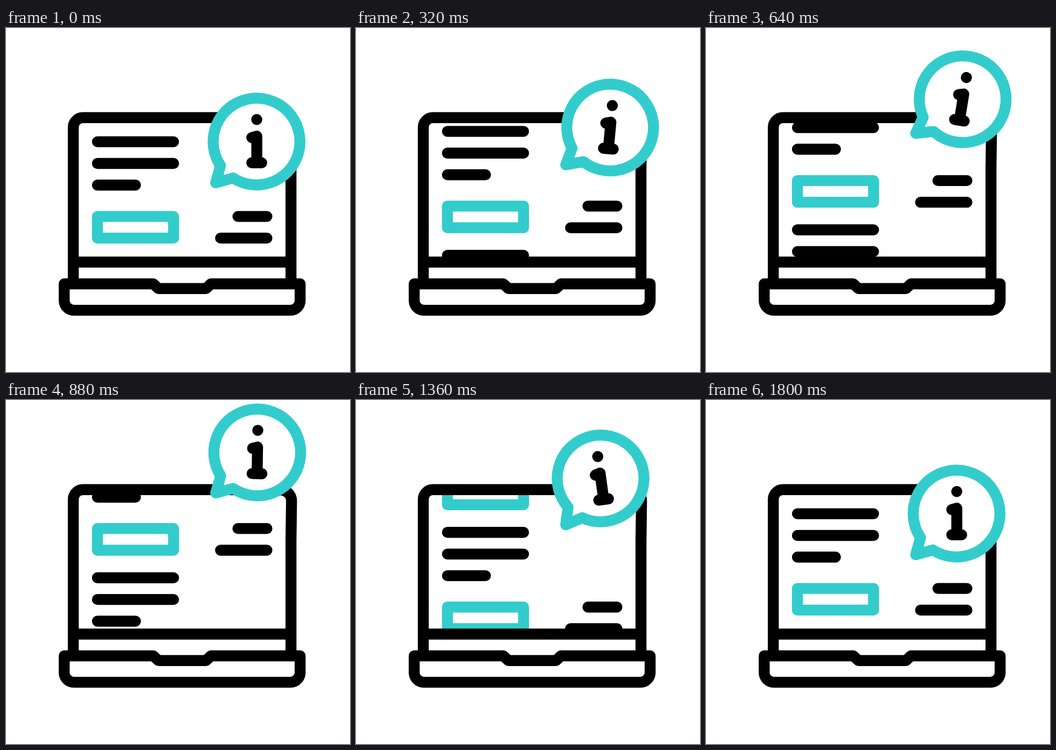
An HTML page that plays this animation: 640 px wide and 640 px high, repeating every 1.82 s.

```html
<!DOCTYPE html>
<html lang="en">
<head>
<meta charset="utf-8">
<title>Laptop information</title>
<style>
  html, body { margin: 0; width: 100%; height: 100%; overflow: hidden; background: #fff; }
  svg { display: block; width: 100vw; height: 100vh; }
  path { fill: none; stroke: #000; stroke-width: 20.4; stroke-linecap: round; stroke-linejoin: round; }
  .accent { stroke: #3cc; }
</style>
</head>
<body>
<svg viewBox="0 0 640 640">
  <defs>
    <clipPath id="screen"><rect x="125" y="167" width="405" height="268"/></clipPath>
    <g id="content">
      <path d="M170.1 211.6H311.7M170.1 252H311.7M170.1 292.3H240.8M431.5 350.6H485.4M399.2 390.9H485.4"/>
      <path class="accent" d="M170.1 350.6H311.7V390.9H170.1Z"/>
    </g>
  </defs>

  <g clip-path="url(#screen)">
    <g id="scroll">
      <use href="#content"/>
      <use href="#content" y="230.6"/>
    </g>
  </g>

  <path d="M125.2 476V185A18 18 0 0 1 143.2 166.8H396L510 167.4C522 167.4 531.2 176 531.2 188L530.2 262V476M125.2 435.5H530.2"/>
  <path d="M108.3 476H274L283.6 484.8H372L381.3 476H547.2V507A18 18 0 0 1 529.2 525.1H126.3A18 18 0 0 1 108.3 507Z"/>

  <g id="bubble">
    <path class="accent" style="fill:#fff" d="M399 256L390.2 287.9L422.3 279A80.7 80.7 0 1 0 399 256Z"/>
    <circle cx="466.5" cy="170.2" r="10.3"/>
    <path d="M457.3 203.8L466.6 201.3V250.8M457.3 250.8H475.6"/>
  </g>
</svg>
<script>
  const LOOP = 1820, END = 1800, PAGE = 230.6, LIFT = 115.2, TILT = 9.5;
  const scroll = document.getElementById('scroll');
  const bubble = document.getElementById('bubble');

  // Eased 0..1 progress between two times.
  function ease(t, from, to) {
    const x = Math.min(1, Math.max(0, (t - from) / (to - from)));
    return x * x * (3 - 2 * x);
  }

  function draw(now) {
    const t = Math.min(now % LOOP, END);
    const lift = LIFT * (ease(t, 0, 900) - ease(t, 900, END));
    const tilt = TILT * (ease(t, 0, 600) - 2 * ease(t, 600, 1200) + ease(t, 1200, END));
    scroll.setAttribute('transform', `translate(0 ${-PAGE * ease(t, 0, END)})`);
    bubble.setAttribute('transform', `translate(0 ${-lift}) rotate(${tilt} 390.2 287.9)`);
  }

  let start;
  function tick(now) {
    start ??= now;
    draw(now - start);
    requestAnimationFrame(tick);
  }
  draw(0);
  requestAnimationFrame(tick);
</script>
</body>
</html>
```
